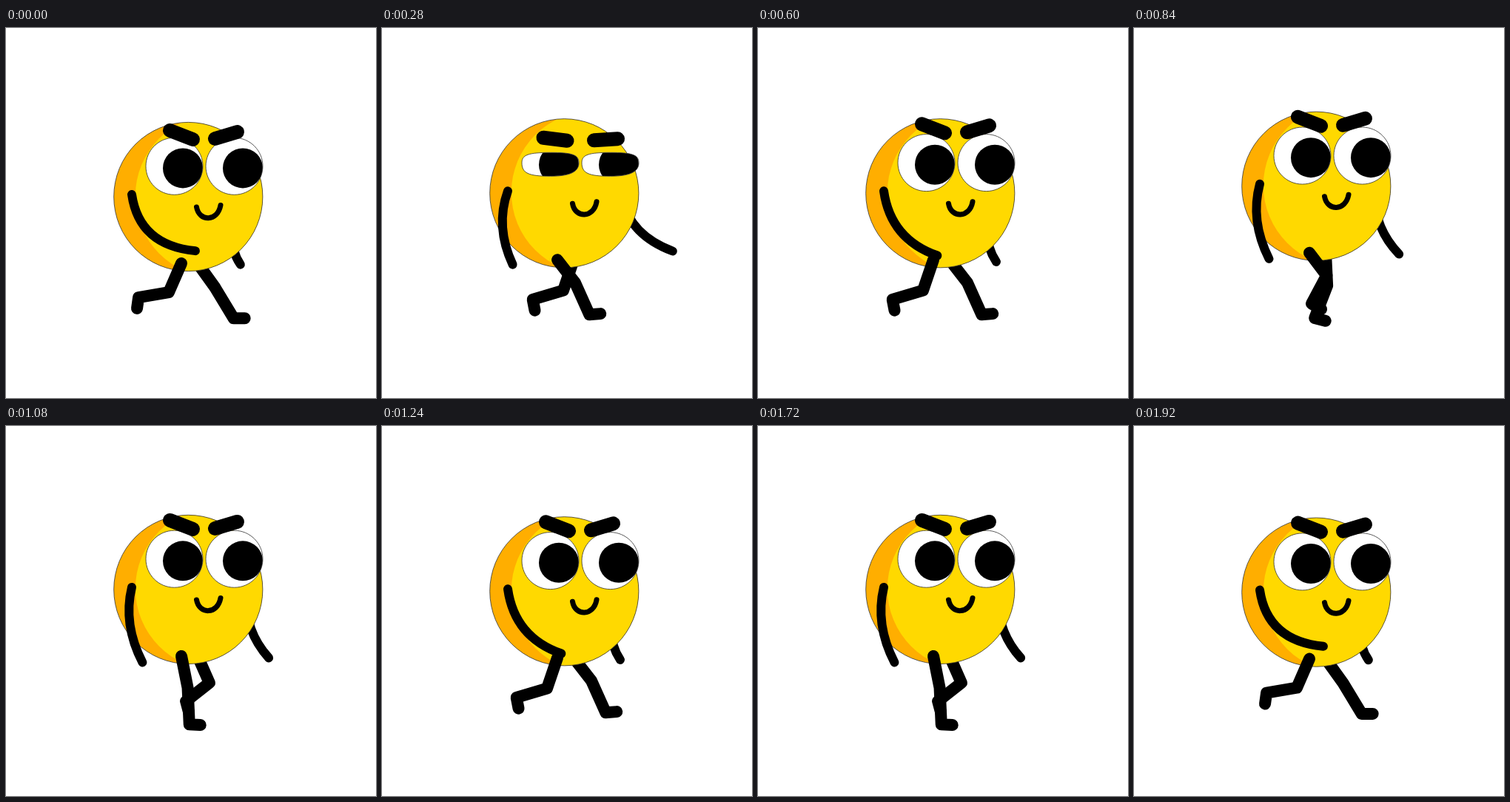
These frames come from a looping animation (500 by 500 pixels, 2040 ms). An HTML page:

```html
<!DOCTYPE html>
<html lang="en">
<head>
<meta charset="utf-8">
<title>Walking ball</title>
<style>
  html, body { margin: 0; width: 100%; height: 100%; overflow: hidden; background: #fff; }
  svg { display: block; width: 100%; height: 100%; }
  .limb { fill: none; stroke: #000; stroke-linecap: round; stroke-linejoin: round; }
  .leg { stroke-width: 16; }
  .arm { stroke-width: 12; }
  .brow { stroke-width: 19; }
  .line { fill: none; stroke: #333; stroke-width: .8; }
</style>
</head>
<body>
<svg viewBox="0 0 500 500">
  <defs>
    <clipPath id="ball"><circle cx="246.3" cy="228" r="100.6"/></clipPath>
    <clipPath id="lid"><path class="lid"/></clipPath>
    <g id="eye">
      <path class="lid" fill="#fff"/>
      <circle cx="239" cy="189.4" r="27" clip-path="url(#lid)"/>
      <path class="lid line"/>
    </g>
  </defs>
  <g id="walker">
    <path id="farArm" class="limb arm"/>
    <path id="farLeg" class="limb leg"/>
    <g clip-path="url(#ball)">
      <circle cx="246.3" cy="228" r="101" fill="#ffae00"/>
      <circle cx="284.8" cy="227" r="110" fill="#ffd900"/>
    </g>
    <circle class="line" cx="246.3" cy="228" r="100.6"/>
    <use href="#eye"/>
    <use href="#eye" x="81"/>
    <path id="leftBrow" class="limb brow"/>
    <path id="rightBrow" class="limb brow"/>
    <path class="limb" stroke-width="7" d="M257.5 242C261 262 286 262 290 239.5"/>
    <path id="nearLeg" class="limb leg"/>
    <path id="nearArm" class="limb arm"/>
  </g>
</svg>
<script>
const STEP = 40, LOOP = 2040, LAST = 48, CYCLE = 16;

const $ = id => document.getElementById(id);
const lids = document.querySelectorAll('.lid');
const draw = (id, d) => $(id).setAttribute('d', d);
const mix = (a, b, k) => a.map((v, i) => v + (b[i] - v) * k);

// mean plus harmonics of the walk cycle, each [order, size, step of its peak]
const wave = (n, mean, ...parts) => parts.reduce((sum, [order, size, peak]) =>
  sum + size * Math.cos(2 * Math.PI * order * (n - peak) / CYCLE), mean);

// joint angles in degrees: 0 points down, 90 points ahead
function leg(id, n, hipX) {
  const bones = [
    [wave(n, 41.5, [1, 3, 13]), wave(n, 13.5, [1, 27.9, 6.86], [2, 7.6, 4.29], [3, 4.7, 2.93])],
    [wave(n, 45, [1, 5, 10]), wave(n, -24.6, [1, 50.4, 8.7], [3, 10, 2.02])],
    [15, wave(n, 51.8, [1, 50, 9.09], [2, 16, 5.07], [3, 7.6, 1.74])]
  ];
  let x = hipX, y = 318, d = `M${x} ${y}`;
  for (const [size, angle] of bones) {
    const a = angle * Math.PI / 180;
    x += size * Math.sin(a);
    y += size * Math.cos(a);
    d += `L${x} ${y}`;
  }
  draw(id, d);
}

// hands swing along shallow arcs; the elbow follows the hand
function arms(n) {
  const near = wave(n, 203, [1, 40, .1], [2, 10, .1], [3, 5.8, .87]);
  const nearY = 328 - (near - 198) ** 2 / 125;
  const nearBend = 180 - (255 - near) ** 2 / 225;
  draw('nearArm', `M170 225Q${nearBend} ${273 + .26 * (near - 176)} ${near} ${nearY}`);

  const far = wave(n, 350, [1, 41.5, 8], [2, 10.4, 8], [3, 4.5, 3.6]);
  const farY = 322 - (far - 338) ** 2 / 190;
  const farBend = 335 - (402 - far) ** 2 / 170;
  draw('farArm', `M325 235Q${farBend} 284 ${far} ${farY}`);
}

function face(squint, lift) {
  const cx = 227.5, rx = 38.5, mid = 186.8;
  const top = mid - 38.5 + 24.7 * squint, low = mid + 38.5 - 20.3 * squint;
  const round = .5523 + .22 * squint;
  const h = rx * round, up = mid - (mid - top) * round, down = mid + (low - mid) * round;
  const l = cx - rx, r = cx + rx;
  const d = `M${l} ${mid}C${l} ${up} ${cx - h} ${top} ${cx} ${top}` +
    `S${r} ${up} ${r} ${mid}S${cx + h} ${low} ${cx} ${low}S${l} ${down} ${l} ${mid}Z`;
  lids.forEach(p => p.setAttribute('d', d));
  const brow = (id, open, shut) => {
    const raised = open.map((v, i) => i % 2 ? v - lift : v);
    draw(id, 'M' + mix(raised, shut, squint).join(' '));
  };
  brow('leftBrow', [221.5, 138.5, 252.5, 150.5], [218, 153, 250, 157]);
  brow('rightBrow', [282.5, 149.5, 312.5, 140.5], [286.5, 156.5, 318.5, 154.5]);
}

function render(now) {
  const n = Math.min(LAST, Math.floor((now % LOOP) / STEP));
  const settle = Math.max(0, 1 - n / 3);
  const bob = wave(n, -7.2, [2, 5.85, .74], [4, 1.7, 2.56]) + 3.4 * settle;
  $('walker').setAttribute('transform', `translate(0 ${bob})`);
  leg('nearLeg', n, 237);
  leg('farLeg', n + CYCLE / 2, 259);
  arms(n);
  const k = Math.max(0, 1 - Math.abs(n - 7) / 5);
  face(k * k * (3 - 2 * k), 4 * (1 - settle));
}

const start = performance.now();
function tick() {
  render(performance.now() - start);
  requestAnimationFrame(tick);
}
tick();
</script>
</body>
</html>
```
